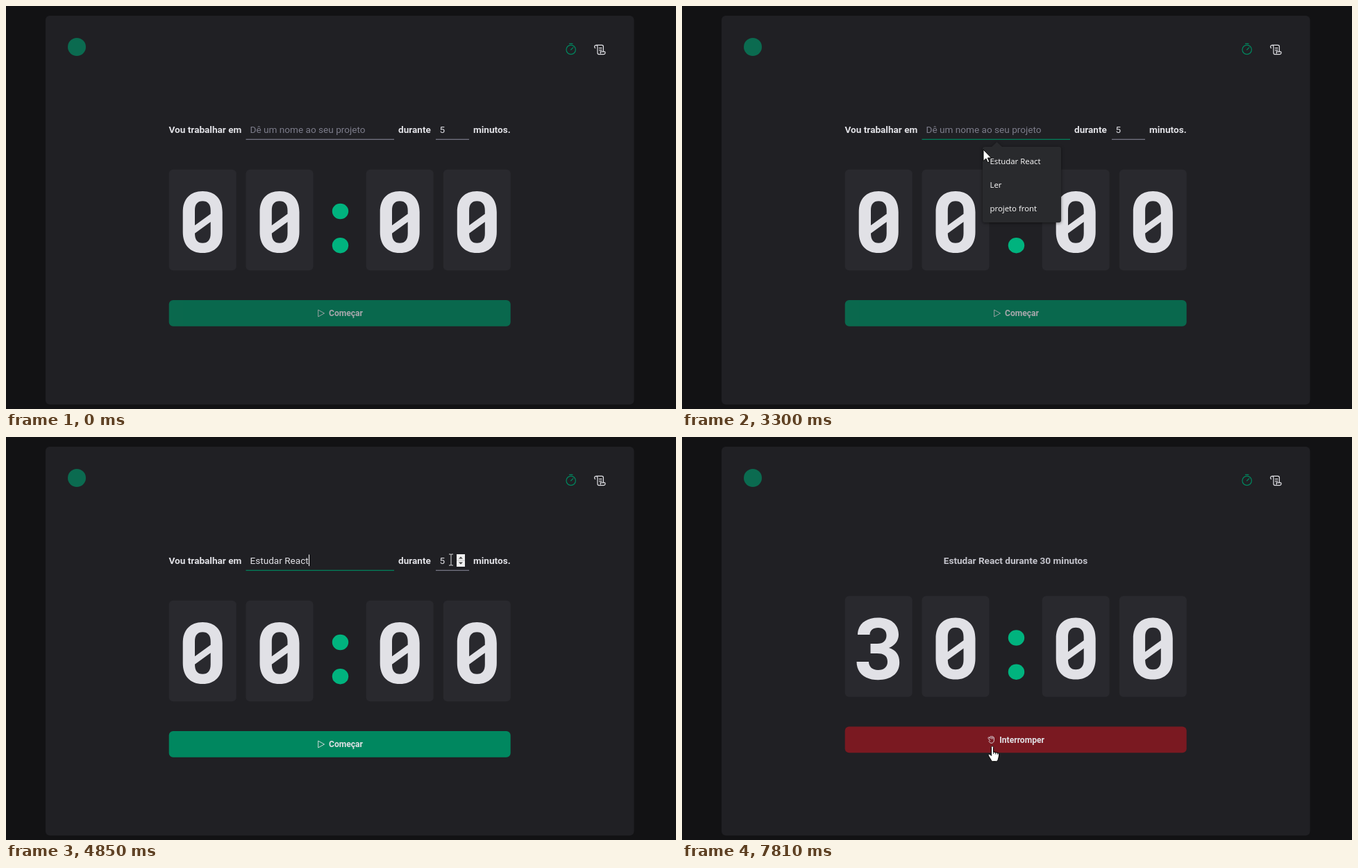
An HTML page for the animation above (8000 ms loop, 965 by 581 pixels).

```html
<!DOCTYPE html>
<html lang="pt-BR">
<head>
<meta charset="utf-8">
<title>Timer</title>
<style>
html, body { margin: 0; width: 100%; height: 100%; overflow: hidden; background: #121214; }
svg { display: block; width: 965px; height: 581px; }
text { font: 13.6px Roboto, sans-serif; fill: #e1e1e6; white-space: pre; }
.bold { font-weight: 700; }
.label { font-size: 12.1px; font-weight: 700; }
#popup text { font: 11.4px "Open Sans", sans-serif; fill: #fff; }
.icon { fill: none; stroke: #e1e1e6; stroke-width: 1.2; stroke-linecap: round; stroke-linejoin: round; }
.pointer { fill: #fff; stroke: #000; stroke-width: 1; stroke-linejoin: round; }
</style>
</head>
<body>
<svg viewBox="0 0 965 581">
  <defs>
    <path id="d0" fill="#e1e1e6" fill-rule="evenodd" d="M20 90V61.5C20 42.500 30.500 31.300 48.500 31.300S77 42.500 77 61.500V90C77 109 66.500 120.300 48.500 120.300S20 109 20 90ZM37.300 80.500 60 64V59C60 50 56 45.500 48.500 45.500S37.300 50 37.300 59ZM60 75.500 37.300 92C37.300 101.500 41 106 48.500 106S60 101.500 60 92Z"/>
    <path id="d3" fill="#e1e1e6" d="M18.300 55.800C18.300 40.800 30.300 31.300 47.300 31.300 66.300 31.300 77.300 40.800 77.300 55.800 77.300 64.800 71.300 71.800 63.300 74.800 73.300 77.800 78.500 84.800 78.500 95.800 78.500 111.800 66.300 121 47.800 121 31.300 121 16.800 112.800 16.800 94.800H34.300C34.300 101.800 39.300 106.800 47.800 106.800 56.300 106.800 61.300 102.300 61.300 94.800 61.300 85.800 55.300 82.800 46.300 82.800H36.800V68.800H46.300C55.300 68.800 59.800 64.300 59.800 56.800 59.800 49.800 55.300 45.800 47.800 45.800 40.300 45.800 35.800 49.800 35.800 55.800Z"/>
  </defs>
  <rect width="965" height="581" fill="#121214"/>
  <rect x="57" y="14" width="847.500" height="560.500" rx="6" fill="#202024"/>
  <circle cx="102" cy="59" r="13" fill="#0b6b50"/>
  <path class="icon" style="stroke:#00875f" d="M807 63a6.700 6.700 0 1 0 13.400 0a6.700 6.700 0 1 0-13.400 0M811.500 54.300h4.500M813.700 63l3.200-3.200"/>
  <path class="icon" d="M848.600 60.600a2.200 2.200 0 1 1 3.400-2v8.800a2.200 2.200 0 0 0 2.200 2.200h6.600a2.200 2.200 0 0 0 1.600-3.800h-6.600q1 .8.4 2.400M849.800 56.400h8.400a2.200 2.200 0 0 1 2.200 2.200v7M854.500 60.700h3.500M854.500 63.600h3.500"/>

  <g id="form">
    <text class="bold" x="234.500" y="182.500">Vou trabalhar em</text>
    <text class="bold" x="565" y="182.500">durante</text>
    <text class="bold" x="673" y="182.500">minutos.</text>
    <rect id="taskLine" x="345.500" y="191.700" width="213.500" height="1.200"/>
    <rect id="minLine" x="619" y="191.700" width="48" height="1.200"/>
    <rect id="selection" x="624" y="170" width="8.500" height="16" fill="#0078d7"/>
    <text id="task" x="351.500" y="182.500"></text>
    <text id="minutes" x="624.500" y="182.500"></text>
    <g id="spinner">
      <rect x="649" y="169" width="12" height="18" fill="#f1f1f1"/>
      <path d="M652 175.500l3-3 3 3zM652 180.500l3 3 3-3z" fill="#444"/>
      <path d="M649 178h12" stroke="#c8c8c8"/>
    </g>
    <rect id="caret" y="169.500" width="1" height="16.500" fill="#fff"/>
  </g>
  <text id="running" class="bold" x="480.500" y="182.500" text-anchor="middle" style="fill:#c4c4cc">Estudar React durante 30 minutos</text>

  <g id="clock">
    <g id="cards"></g>
    <ellipse cx="481.500" cy="296" rx="11.700" ry="11.200" fill="#00b37e"/>
    <ellipse cx="481.500" cy="345.200" rx="11.700" ry="11.200" fill="#00b37e"/>
    <g id="button">
      <rect id="buttonBox" x="234.700" y="424" width="492" height="37.800" rx="6"/>
      <g id="start">
        <path class="icon" style="stroke-width:.9" d="M450 438.300l8.500 4.700-8.500 4.700z"/>
        <text class="label" x="465" y="447">Começar</text>
      </g>
      <g id="stop">
        <path class="icon" style="stroke-width:.9" d="M443.700 444.500l-2.500-3.500q-.7-1.400.5-1.600t1.900 1.600v-2.200q1.300-1.600 2 0v2.800M445.600 438.500q1-1.500 2 0v3.200M447.600 439.500q1.300-1.200 1.800.2v4c0 5-6.400 5.500-7.300 1.500"/>
        <text class="label" x="457.300" y="447">Interromper</text>
      </g>
    </g>
  </g>

  <g id="popup">
    <path d="M436 203h10l7.500-7 7.500 7h82q3 0 3 3v103q0 3-3 3H436q-3 0-3-3V206q0-3 3-3z" fill="#292a2d" style="filter:drop-shadow(0 1px 2px #0008)"/>
    <rect id="hoverRow" x="433" y="207" width="113" height="34" fill="#3f4043"/>
    <text x="443.500" y="228">Estudar React</text>
    <text x="443.500" y="262">Ler</text>
    <text x="443.500" y="296">projeto front</text>
  </g>

  <g id="cursor">
    <path id="arrow" class="pointer" d="M0 0V16.500L3.800 13 6.300 18.600 8.800 17.500 6.300 12H11.500z"/>
    <path id="beam" d="M-3-8h2.200q.8 0 .8.800 0-.8.800-.8H3M0-7.500v15M-3 8h2.200q.8 0 .8-.8 0 .8.800.8H3" fill="none" stroke="#ddd"/>
    <g id="hand">
      <path class="pointer" d="M-1.600 1.500C-1.600-.7 1.600-.7 1.600 1.500V8l6.200 1.400q2.300.8 1.900 3.400L8.600 18q-.6 3.700-3 3.700H.5q-1.200 0-2-1.400L-5 14.500q-1.600-2.500 0-3.200 1.300-.5 2.300.9l1.100 1.300z"/>
      <path d="M1.600 7.500v3.500M4.500 8.500v3M7.200 9.300v2.700" stroke="#000" stroke-width=".8"/>
    </g>
  </g>
</svg>
<script>
const LOOP = 8000, STEP = 50;
const $ = id => document.getElementById(id);
const show = (id, on) => { $(id).style.display = on ? '' : 'none'; };
const within = (t, a, b) => t >= a && t < b;

// Pointer route: time, x, y
const route = [
  [290, 958, 388], [640, 800, 190], [890, 670, 62], [990, 612, 46], [1090, 549, 46],
  [1290, 476, 108], [1540, 407, 184], [2140, 406.5, 183], [3150, 406.5, 183],
  [3300, 434, 207], [3500, 451, 217], [4000, 451, 217], [4400, 545, 216],
  [4750, 641, 177], [5000, 641, 177], [5300, 620, 172], [6810, 620, 172],
  [7010, 473, 333], [7160, 451, 430], [7260, 447, 446], [LOOP, 447, 446]
];

function pointerAt(t) {
  const i = route.findIndex(p => p[0] > t);
  const [t0, x0, y0] = route[i - 1], [t1, x1, y1] = route[i];
  const k = Math.floor((t - t0) / STEP) * STEP / (t1 - t0);
  return [x0 + (x1 - x0) * k, y0 + (y1 - y0) * k];
}

function drawPointer(t) {
  show('cursor', t >= 290);
  if (t < 290) return;
  const [x, y] = pointerAt(t);
  const inField = within(y, 164, 194) && (within(x, 345, 560) || within(x, 618, 668));
  const onButton = y > 417;
  $('cursor').setAttribute('transform', `translate(${x} ${y})`);
  show('beam', inField);
  show('hand', onButton);
  show('arrow', !inField && !onButton);
}

function drawForm(t) {
  const filled = t >= 3900, minFocus = t >= 5000;
  $('task').textContent = filled ? 'Estudar React' : 'Dê um nome ao seu projeto';
  $('task').style.fill = filled ? '#e1e1e6' : '#7c7c8a';
  $('minutes').textContent = t < 5910 ? '5' : t < 6060 ? '3' : '30';
  $('taskLine').style.fill = t >= 2750 && !minFocus ? '#00875f' : '#7c7c8a';
  $('minLine').style.fill = minFocus ? '#00875f' : '#7c7c8a';
  show('spinner', t >= 4750);
  show('selection', within(t, 5200, 5910));

  const caret = within(t, 2750, 3250) ? 351.5
    : within(t, 3900, 4350) || within(t, 4850, 5000) ? 436
    : within(t, 5910, 6060) ? 632
    : within(t, 6060, 6610) || t >= 7110 ? 639.7 : 0;
  show('caret', caret);
  $('caret').setAttribute('x', caret);
}

function drawPopup(t) {
  const alpha = t < 2750 ? 0 : t < 2800 ? 0.5 : t < 3900 ? 1 : t < 3950 ? 0.6 : t < 4000 ? 0.18 : 0;
  const scale = t < 3900 ? 1 : 0.96;
  show('popup', alpha);
  show('hoverRow', t >= 3350);
  $('popup').style.opacity = alpha;
  $('popup').setAttribute('transform', `translate(489.5 258) scale(${scale}) translate(-489.5 -258)`);
}

function drawClock(t, running) {
  show('form', !running);
  show('running', running);
  show('start', !running);
  show('stop', running);
  $('clock').setAttribute('transform', `translate(0 ${running ? -6.5 : 0})`);
  $('firstDigit').setAttribute('href', running ? '#d3' : '#d0');
  $('button').style.opacity = t < 3900 ? 0.7 : 1;
  $('buttonBox').style.fill = running ? '#7a1921' : t >= 7210 ? '#015f43' : '#00875f';
}

function frame() {
  const t = performance.now() % LOOP;
  drawForm(t);
  drawPopup(t);
  drawClock(t, t >= 7710);
  drawPointer(t);
  requestAnimationFrame(frame);
}

$('cards').innerHTML = [234.7, 345.5, 518.7, 629.8].map((x, i) => `
  <g transform="translate(${x} 235.7)">
    <rect width="97" height="145.500" rx="6" fill="#29292e"/>
    <use ${i ? '' : 'id="firstDigit"'} href="#d0"/>
  </g>`).join('');
frame();
</script>
</body>
</html>
```
